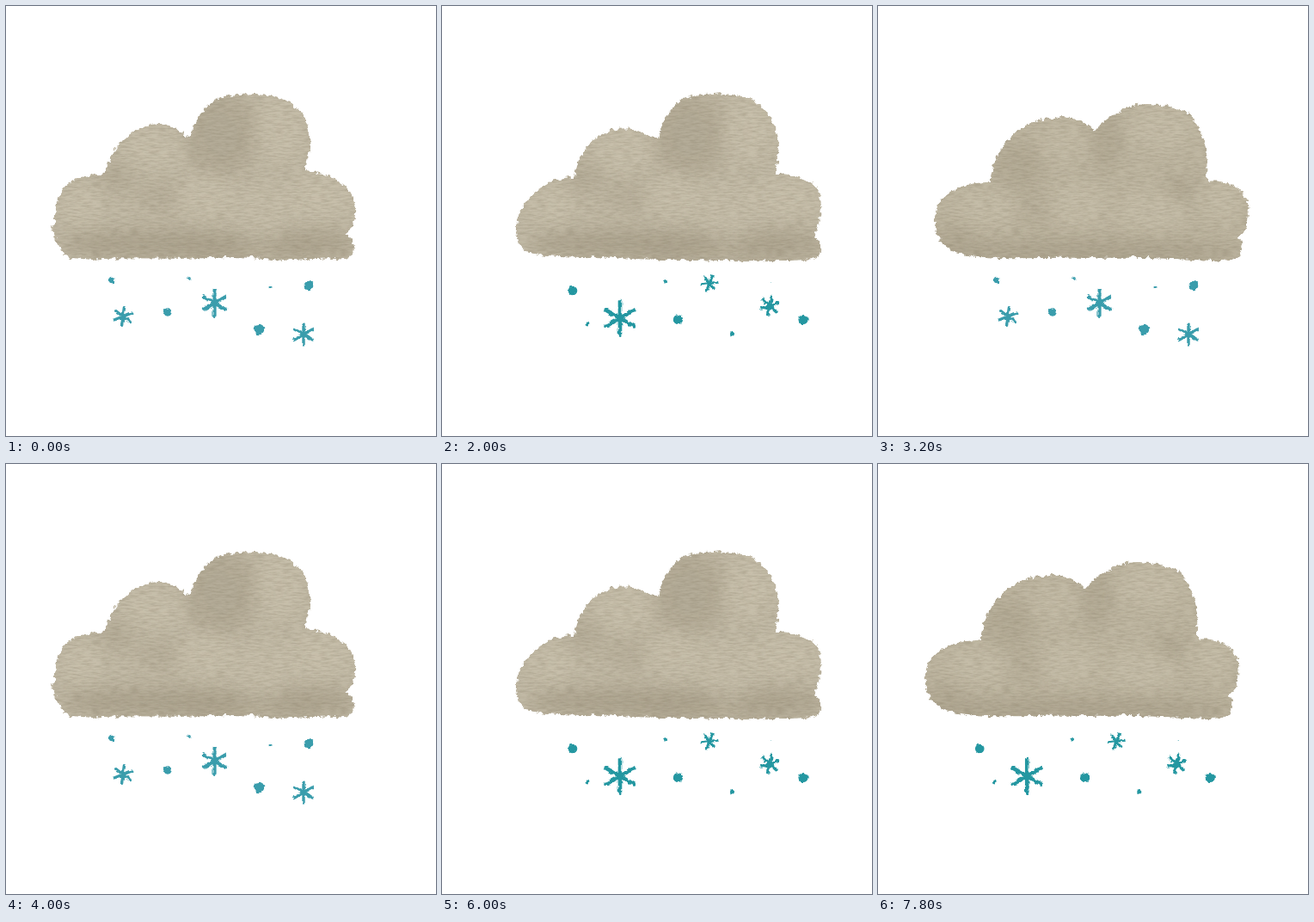
Recreate the animation shown at these times as an HTML page. Size 500 by 500 pixels, loop 8010 ms.

```html
<!DOCTYPE html>
<html lang="en">
<head>
<meta charset="utf-8">
<title>Snow cloud</title>
<style>
html, body { margin: 0; width: 100%; height: 100%; overflow: hidden; background: #fff; }
svg { display: block; width: 100vw; height: 100vh; }
</style>
</head>
<body>
<svg viewBox="0 0 500 500">
  <defs>
    <filter id="paint" filterUnits="userSpaceOnUse" x="0" y="0" width="500" height="500" color-interpolation-filters="sRGB">
      <feTurbulence type="fractalNoise" baseFrequency=".18" numOctaves="3" seed="4" result="rough"/>
      <feDisplacementMap in="SourceGraphic" in2="rough" scale="7" xChannelSelector="R" yChannelSelector="G" result="shape"/>
      <feTurbulence type="fractalNoise" baseFrequency=".09 .5" numOctaves="3" seed="9"/>
      <feColorMatrix values="0 0 0 0 .47  0 0 0 0 .43  0 0 0 0 .34  .5 0 0 0 -.18"/>
      <feComposite in2="shape" operator="in" result="grain"/>
      <feMerge><feMergeNode in="shape"/><feMergeNode in="grain"/></feMerge>
    </filter>
    <filter id="ink" filterUnits="userSpaceOnUse" x="0" y="0" width="500" height="500" color-interpolation-filters="sRGB">
      <feTurbulence type="fractalNoise" baseFrequency=".22" numOctaves="2" seed="7" result="rough"/>
      <feDisplacementMap in="SourceGraphic" in2="rough" scale="4" xChannelSelector="R" yChannelSelector="G"/>
    </filter>
    <filter id="soft" x="-60%" y="-60%" width="220%" height="220%"><feGaussianBlur stdDeviation="9"/></filter>
  </defs>
  <g id="stage"></g>
</svg>
<script>
const STEP = 200, LOOP = 8010, FRAMES = 40, HALF = 10;
const DARK = '#aaa18c', LIGHT = '#cac2ae';

// Sideways sway: out for ten steps, back for ten.
const sway = k => 3.75 * (HALF - Math.abs(HALF - k % 20));

// Blotches: [x, y, rx, ry, tone, opacity], placed for a sway of zero.
const tallShade = [
  [250, 150, 42, 48, DARK, .55], [318, 145, 28, 38, LIGHT, .6], [172, 168, 36, 26, LIGHT, .6],
  [128, 200, 22, 16, DARK, .45], [180, 222, 28, 16, DARK, .35], [90, 232, 26, 24, LIGHT, .6],
  [232, 222, 36, 26, LIGHT, .6], [362, 224, 40, 26, LIGHT, .6], [295, 235, 38, 28, LIGHT, .45],
  [175, 277, 110, 17, DARK, .8], [275, 285, 80, 12, DARK, .5], [358, 277, 48, 16, DARK, .75]
];
const wideShade = [
  [148, 185, 28, 28, DARK, .5], [250, 155, 18, 38, DARK, .5], [336, 212, 18, 14, DARK, .6],
  [200, 160, 30, 22, LIGHT, .4], [312, 142, 40, 24, LIGHT, .55], [110, 236, 34, 22, LIGHT, .5],
  [215, 232, 40, 25, LIGHT, .5], [302, 240, 42, 26, LIGHT, .5], [384, 226, 24, 24, LIGHT, .5],
  [230, 286, 180, 15, DARK, .75], [75, 272, 24, 18, DARK, .5], [170, 235, 18, 24, DARK, .3]
];

// Each outline is drawn where it stands at step `at`.
const clouds = [
  { at: 0, base: '#c2baa6', shade: tallShade, d: 'M75 293C62 287 57 274 56 263L51 258L57 254C56 238 59 222 68 210C80 199 98 195 114 196C119 176 130 158 148 146C162 137 178 134 193 140C202 145 208 151 214 152C219 136 228 118 244 108C258 102 275 103 290 102C314 104 333 110 342 122C352 136 355 152 353 165C352 175 349 183 347 191C366 192 384 200 396 211C406 222 408 238 405 248C403 256 399 261 396 266C405 270 407 281 403 288C398 295 390 295 380 294C360 293 340 295 322 296C300 295 270 290 240 293C190 295 130 292 100 295Z' },
  { at: 6, base: '#bfb7a2', shade: wideShade, d: 'M105 292C88 290 77 279 74 264C71 247 74 231 86 221C98 210 120 205 140 205C143 180 152 158 170 143C186 130 206 128 226 128C243 129 254 135 259 142C268 126 286 116 306 114C326 111 350 116 366 126C382 136 390 150 393 165C395 176 393 185 391 195C408 193 424 201 432 213C439 224 440 242 436 252C435 259 431 263 430 266C437 268 436 282 431 289C424 297 408 297 399 293C370 292 350 296 320 295C250 291 180 294 140 293Z' },
  { at: 10, base: '#c2baa6', shade: tallShade, d: 'M100 287C89 282 86 268 87 254C89 238 98 224 112 213C124 203 140 199 154 199C156 180 166 163 180 153C193 143 207 141 222 143C235 147 243 153 251 154C254 138 264 120 276 110C288 103 306 103 324 101C345 104 363 107 374 119C386 133 392 150 392 165C391 176 389 186 388 195C406 194 424 200 434 210C441 219 442 233 440 244C438 255 436 262 433 269C441 273 443 281 440 289C434 296 420 295 405 296C370 296 330 297 290 295C240 296 200 292 160 292C140 291 120 291 108 288Z' },
  { at: 13, base: '#c2baa6', shade: tallShade, d: 'M92 291C80 287 76 275 76 262C75 240 86 222 100 210C113 200 128 197 143 196C147 176 158 158 172 150C184 142 198 139 212 143C225 147 233 154 241 155C247 138 262 122 280 113C296 106 318 106 336 111C354 118 368 134 375 148C381 163 380 178 378 192C396 191 412 199 423 212C433 224 436 238 432 249C430 256 427 261 425 265C434 269 436 280 431 287C424 295 408 294 395 293C375 295 355 296 335 296C300 294 230 291 200 293C160 294 120 293 105 294Z' },
  { at: 19, base: '#bfb7a2', shade: wideShade, d: 'M125 293C100 291 78 289 66 278C54 268 53 250 56 238C60 224 76 212 92 208C103 205 112 205 119 205C122 180 134 158 152 144C168 132 188 129 204 129C222 130 235 138 240 145C252 130 272 119 288 115C308 112 330 116 346 122C358 131 365 146 369 162C373 176 371 190 371 204C388 201 405 208 414 219C421 230 421 245 417 257C414 264 409 267 407 269C414 270 414 284 409 290C404 296 394 296 380 296C330 294 290 292 240 293C200 292 160 294 125 293Z' }
];

// Dots: [x, y, r]; stars: [x, y, r, line width, turn in degrees].
const snows = [
  { at: 0, color: '#3a9dac',
    dots: [[123, 319, 3.2], [213, 317, 1.9], [188, 356, 4.7], [307.5, 327, 2], [352, 325, 5.3], [294, 376, 6.3]],
    stars: [[136, 361, 10.5, 3.4, 8], [242.5, 345.5, 14.5, 4.2, 0], [346, 382, 12, 3.4, 0]] },
  { at: 6, color: '#2497a1',
    dots: [[137, 331, 5.3], [154, 370, 2.4], [244, 320.5, 2], [259.5, 364.5, 5.6], [322.5, 381, 2.5], [405, 364.5, 5.6], [368, 321, .7]],
    stars: [[192, 363, 19, 4.6, 0], [296, 322.5, 9, 3, 22], [366, 348.5, 10.5, 3.8, 12]] }
];

function cloudMarkup({ at, base, shade, d }, i) {
  const blots = shade.map(([x, y, rx, ry, tone, o]) =>
    `<ellipse cx="${x + sway(at)}" cy="${y}" rx="${rx}" ry="${ry}" fill="${tone}" opacity="${o}" filter="url(#soft)"/>`).join('');
  return `<g><g filter="url(#paint)"><clipPath id="edge${i}"><path d="${d}"/></clipPath>
    <g clip-path="url(#edge${i})"><path d="${d}" fill="${base}"/>${blots}</g></g></g>`;
}

function starPath([x, y, r, , turn]) {
  return [0, 1, 2, 3, 4, 5].map(i => {
    const a = (i * 60 + turn) * Math.PI / 180;
    return `M${x} ${y}l${r * Math.sin(a)} ${-r * Math.cos(a)}`;
  }).join('');
}

function snowMarkup({ color, dots, stars }) {
  return `<g><g filter="url(#ink)" fill="${color}" stroke-linecap="round">` +
    dots.map(([x, y, r]) => `<circle cx="${x}" cy="${y}" r="${r}"/>`).join('') +
    stars.map(s => `<path d="${starPath(s)}" stroke="${color}" stroke-width="${s[3]}"/>`).join('') +
    '</g></g>';
}

const stage = document.getElementById('stage');
stage.innerHTML = clouds.map(cloudMarkup).join('') + snows.map(snowMarkup).join('');
const nodes = [...stage.children];
const cloudNodes = nodes.slice(0, clouds.length), snowNodes = nodes.slice(clouds.length);

function cloudIndex(k) {
  const p = k % 20;
  return p < 5 ? 0 : p < 10 ? 1 : p < 13 ? 2 : p < 15 ? 3 : 4;
}

function show(list, items, chosen, k) {
  list.forEach((node, i) => {
    node.setAttribute('display', i === chosen ? 'inline' : 'none');
    node.setAttribute('transform', `translate(${sway(k) - sway(items[i].at)} 0)`);
  });
}

let last = -1;
const start = performance.now();
function tick() {
  const t = (performance.now() - start) % LOOP;
  const k = Math.min(FRAMES - 1, Math.floor(t / STEP));
  if (k !== last) {
    show(cloudNodes, clouds, cloudIndex(k), k);
    show(snowNodes, snows, k % 4 < 2 ? 0 : 1, k);
    last = k;
  }
  requestAnimationFrame(tick);
}
tick();
</script>
</body>
</html>
```
